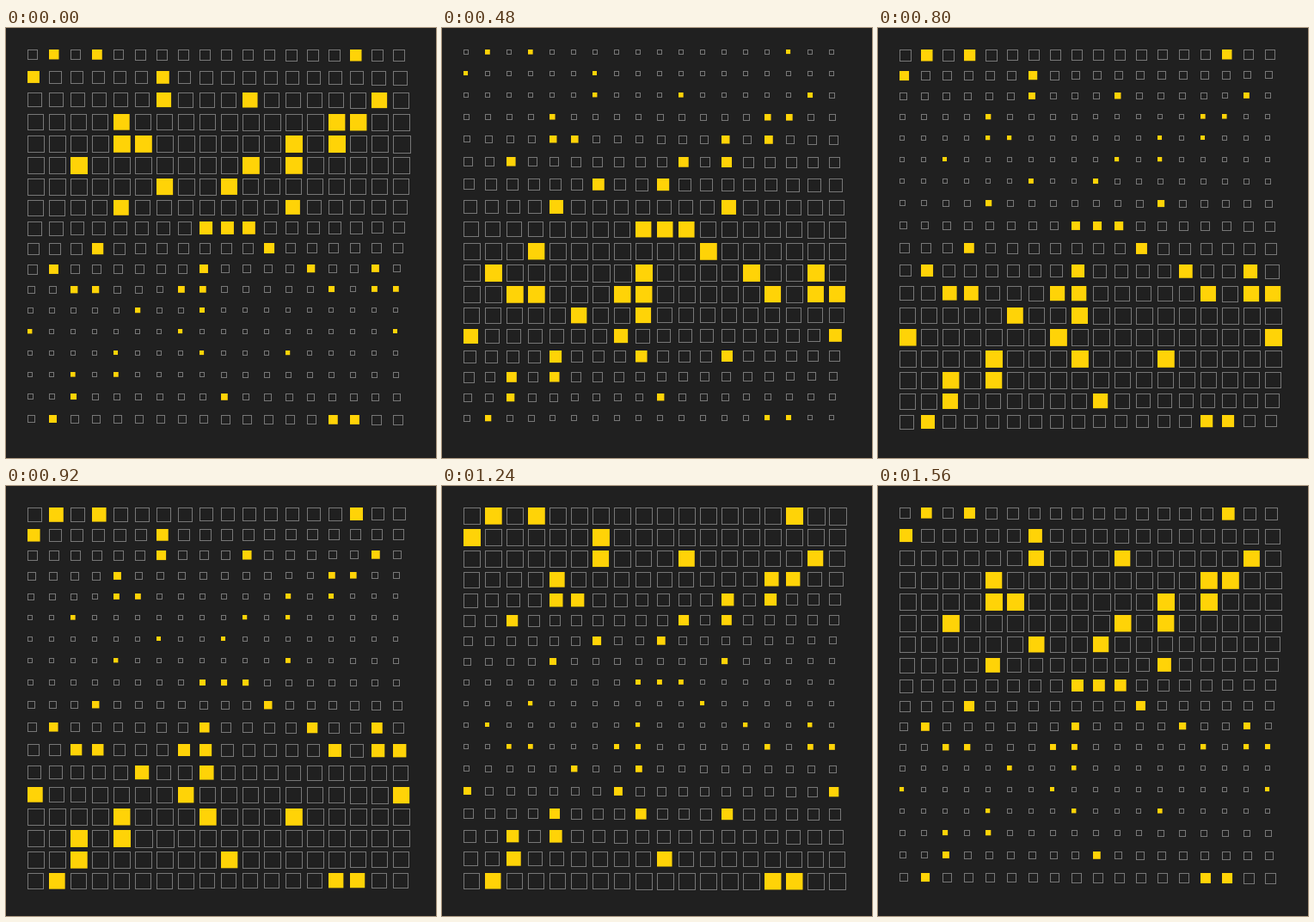
These frames come from a looping animation (500 by 500 pixels, 1600 ms). An HTML page with a canvas:

```html
<!DOCTYPE html>
<html lang="en">
<head>
<meta charset="utf-8">
<title>Square wave grid</title>
<style>
  html, body { margin: 0; width: 100%; height: 100%; overflow: hidden; background: #202020; }
  canvas { display: block; }
</style>
</head>
<body>
<canvas id="stage" width="500" height="500"></canvas>
<script>
const ctx = document.getElementById('stage').getContext('2d');

const GRID = 18, PITCH = 25, STEPS = 40, STEP_MS = 40;
const MIN_SIZE = 5, MAX_SIZE = 20;

// Filled columns, row by row
const filled = [
  [1, 3, 15], [0, 6], [6, 10, 16], [4, 14, 15], [4, 5, 12, 14], [2, 10, 12],
  [6, 9], [4, 12], [8, 9, 10], [3, 11], [1, 8, 13, 16], [2, 3, 7, 8, 14, 16, 17],
  [5, 8], [0, 7, 17], [4, 8, 12], [2, 4], [2, 9], [1, 14, 15]
];

// One full wave spans all cells in reading order and travels downwards
function sizeAt(index, step) {
  const turn = index / (GRID * GRID) - (step + 1) / STEPS;
  const level = (1 + Math.sin(turn * 2 * Math.PI)) / 2;
  return MIN_SIZE + (MAX_SIZE - MIN_SIZE) * level;
}

function draw(step) {
  ctx.fillStyle = '#202020';
  ctx.fillRect(0, 0, 500, 500);
  ctx.fillStyle = '#ffd307';
  ctx.strokeStyle = '#777777';
  ctx.lineWidth = 1;

  for (let row = 0; row < GRID; row++) {
    for (let col = 0; col < GRID; col++) {
      const x = PITCH * (col + 1), y = PITCH * (row + 1);
      const size = sizeAt(row * GRID + col, step);
      if (filled[row].includes(col)) {
        ctx.fillRect(x, y, size, size);
      } else {
        // Outlines snap to whole pixels
        const side = Math.floor(size + 0.001);
        ctx.strokeRect(x + 0.5, y + 0.5, side, side);
      }
    }
  }
}

const start = performance.now();

function tick() {
  const elapsed = performance.now() - start;
  draw(Math.floor(elapsed / STEP_MS + 0.05) % STEPS);
  requestAnimationFrame(tick);
}
tick();
</script>
</body>
</html>
```
